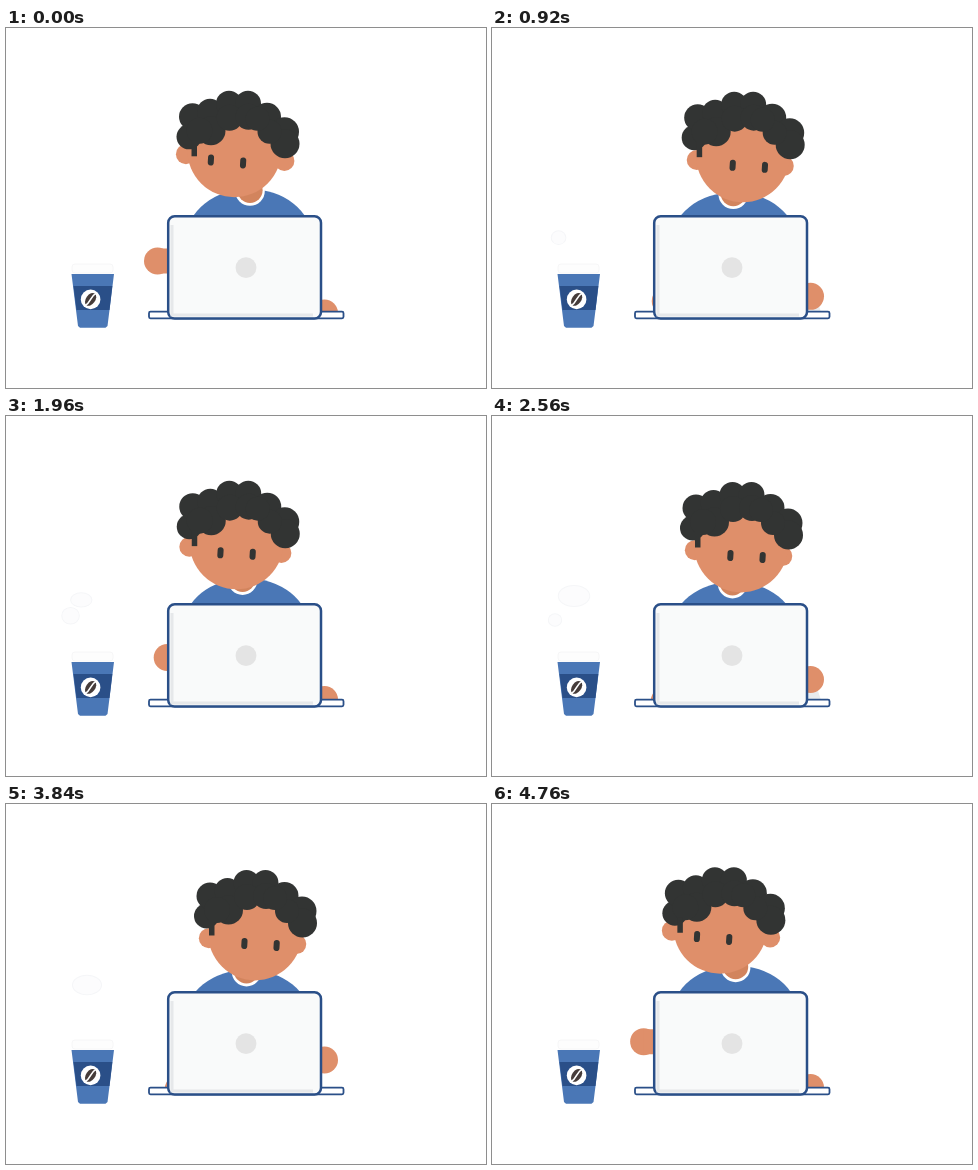
An HTML page with a canvas that plays this animation: 480 px wide and 360 px high, repeating every 4800 ms.

```html
<!DOCTYPE html>
<html lang="en">
<head>
<meta charset="utf-8">
<title>Working at a laptop</title>
<style>
  html, body { margin: 0; width: 100%; height: 100%; overflow: hidden; background: #fff; }
  canvas { display: block; width: 480px; height: 360px; }
</style>
</head>
<body>
<canvas id="stage" width="480" height="360"></canvas>
<script>
const ctx = document.getElementById('stage').getContext('2d');
const LOOP = 4800, STEP = 40, SWAY = 1600, TYPE = 400;
const SKIN = '#df8f6a', NECK = '#d2845d', HAIR = '#323433', BLUE = '#4a77b6', NAVY = '#2a4f88';

// time, head x, hair top, face turn, collar x, body drop
const POSES = [
  [0, 231.5, 62.8, -10.5, 244, 0],
  [200, 229.6, 68.8, -7, 239, 5],
  [240, 229.5, 69, -5.75, 238.5, 5],
  [400, 232.7, 63.4, 0.3, 236, 0],
  [440, 234.5, 64, 1.5, 236, 0.6],
  [600, 246, 67.5, 5, 239.5, 5],
  [640, 249, 66, 5.5, 240.5, 4.6],
  [800, 254, 58, 7.5, 243, 0]
];
const RIGHT_HAND = [[0, 285], [40, 279], [160, 263.5], [240, 256], [360, 283.5], [400, 285]];
const PUFF_LOW = [[0, 74, 239, 3], [440, 68, 226, 5], [1360, 66, 199, 11], [2560, 63, 204, 8], [3300, 61, 202, 3]];
const PUFF_HIGH = [[1360, 70, 187, 6], [2560, 82, 180, 13], [3440, 80, 181, 14], [3840, 81, 181, 12], [4200, 82, 180, 6]];

// Locks of hair, measured from the head centre and hair top: x, y, radius
const LOCKS = [
  [-48.5, 46, 12.5], [-45, 26, 13.5], [-27.5, 21, 13], [-8.5, 13, 13], [10.5, 13, 13],
  [29.5, 26, 14], [47, 41, 14.5], [47.5, 53, 14.5], [-26.5, 40, 14.5], [-8, 27, 13],
  [11, 26, 13], [32, 41, 12], [-38, 40, 13], [20, 28, 12]
];

// Cubic through the keys, at rest at both ends
function sample(keys, t) {
  const last = keys.length - 1;
  if (t <= keys[0][0]) return keys[0].slice(1);
  if (t >= keys[last][0]) return keys[last].slice(1);
  const i = keys.findIndex(k => k[0] > t) - 1;
  const a = keys[i], b = keys[i + 1], span = b[0] - a[0], s = (t - a[0]) / span;
  const slope = (n, c) => n === 0 || n === last ? 0 :
    (keys[n + 1][c] - keys[n - 1][c]) / (keys[n + 1][0] - keys[n - 1][0]);
  return a.slice(1).map((v, k) => {
    const c = k + 1, s2 = s * s, s3 = s2 * s;
    return v * (2 * s3 - 3 * s2 + 1) + b[c] * (3 * s2 - 2 * s3) +
      span * (slope(i, c) * (s3 - 2 * s2 + s) + slope(i + 1, c) * (s3 - s2));
  });
}

function oval(x, y, rx, ry, color, angle = 0) {
  ctx.beginPath();
  ctx.ellipse(x, y, rx, ry, angle, 0, Math.PI * 2);
  ctx.fillStyle = color;
  ctx.fill();
}
const disc = (x, y, r, color) => oval(x, y, r, r, color);

function box(x, y, w, h, r, fill, stroke, width) {
  ctx.beginPath();
  ctx.roundRect(x, y, w, h, r);
  if (fill) { ctx.fillStyle = fill; ctx.fill(); }
  if (stroke) { ctx.strokeStyle = stroke; ctx.lineWidth = width; ctx.stroke(); }
}

function line(points, color, width) {
  ctx.beginPath();
  points.forEach(p => ctx.lineTo(...p));
  ctx.strokeStyle = color;
  ctx.lineWidth = width;
  ctx.stroke();
}

function shape(points, color) {
  ctx.beginPath();
  points.forEach(p => ctx.lineTo(...p));
  ctx.closePath();
  ctx.fillStyle = color;
  ctx.fill();
}

function drawBody(collar, drop) {
  oval(145.5 + collar * 0.4, 211 + drop, 63, 50, BLUE);
  disc(collar, 163 + drop, 14.8, '#fff');
  disc(collar, 162.3 + drop, 12.6, NECK);
}

function drawHead(x, top, turn) {
  ctx.save();
  ctx.translate(x, top);
  disc(-48 + turn * 0.34, 66.5 + turn * 0.3, 10, SKIN);
  disc(43.2 - turn * 0.35, 72.7 + turn * 0.25, 10, SKIN);
  disc(-1 + turn * 0.2, 62 + turn * 0.25, 47, SKIN);
  LOCKS.forEach(([lx, ly, r]) => disc(lx, ly, r, HAIR));
  box(-46, 50, 5.5, 15.5, 0, HAIR);
  const tilt = turn < 0 ? 0.6 - turn * 0.08 : 0.6 + turn * 0.07;
  for (const side of [-1, 1]) {
    ctx.save();
    ctx.translate(turn + side * 16.1, 73.2 + turn * 0.24 + side * tilt);
    ctx.rotate(0.06);
    box(-3, -5.5, 6, 11, 3, HAIR);
    ctx.restore();
  }
  ctx.restore();
}

function drawHands(t, sway) {
  const beat = t % TYPE;
  const edge = 149.5 - 11.5 * Math.cos(Math.PI * sway / 800);
  const leftY = 257 - 24 * Math.cos(2 * Math.PI * beat / TYPE) + (edge - 138) * 0.4;
  const [rightY] = sample(RIGHT_HAND, beat);
  ctx.save();
  ctx.beginPath();
  ctx.rect(0, 0, 480, 283.5);
  ctx.clip();
  disc(edge + 13.5, leftY, 13.5, SKIN);
  box(edge + 13.5, leftY - 12.5, 14, 25, 0, SKIN);
  if (beat > 100 && beat < 200) shape([[315, 270], [325, 272], [329, 284], [315, 284]], '#e8ebee');
  disc(318.5, rightY, 13.5, SKIN);
  ctx.restore();
}

function drawLaptop() {
  box(143, 283.7, 194.5, 6.6, 1.5, '#fff', NAVY, 1.8);
  box(162.2, 188.2, 152.8, 102.3, 6.5, '#f9fafa', NAVY, 2.5);
  line([[166, 197], [166, 287], [307, 287]], '#e6e8ea', 3);
  disc(240, 239.7, 10.4, '#e4e4e4');
}

function drawCup() {
  box(66, 236, 41, 9, 3, '#fdfdfd', '#f6f6f7', 1);
  shape([[65.5, 246], [108, 246], [101.5, 298], [99.5, 299.8], [74, 299.8], [72, 298]], BLUE);
  shape([[67.5, 258], [106.3, 258], [103.5, 282], [70.5, 282]], NAVY);
  disc(84.6, 271.4, 9.8, '#fff');
  ctx.save();
  ctx.translate(84.6, 271.4);
  ctx.rotate(0.62);
  oval(0, 0, 4.6, 7.2, '#463c3a');
  ctx.beginPath();
  ctx.moveTo(0.8, -8);
  ctx.bezierCurveTo(-2, -2, 2, 2, -0.8, 8);
  ctx.strokeStyle = '#fff';
  ctx.lineWidth = 1.6;
  ctx.stroke();
  ctx.restore();
}

function drawPuff(keys, t, wide) {
  if (t < keys[0][0] || t > keys[keys.length - 1][0]) return;
  const [x, y, r] = sample(keys, t);
  oval(x, y, r * wide, r * 0.85, '#f5f6f8');
  oval(x, y, r * wide - 1, r * 0.85 - 1, '#fcfcfd');
}

function draw(t) {
  const phase = t % SWAY, sway = Math.min(phase, SWAY - phase);
  const [x, top, turn, collar, drop] = sample(POSES, sway);
  ctx.fillStyle = '#fff';
  ctx.fillRect(0, 0, 480, 360);
  drawPuff(PUFF_LOW, t, 0.9);
  drawPuff(PUFF_HIGH, t, 1.25);
  drawBody(collar, drop);
  drawHead(x, top, turn);
  drawHands(t, sway);
  drawLaptop();
  drawCup();
}

const start = performance.now();
function tick() {
  const t = (performance.now() - start) % LOOP;
  draw(Math.floor(t / STEP) * STEP);
  requestAnimationFrame(tick);
}
tick();
</script>
</body>
</html>
```
